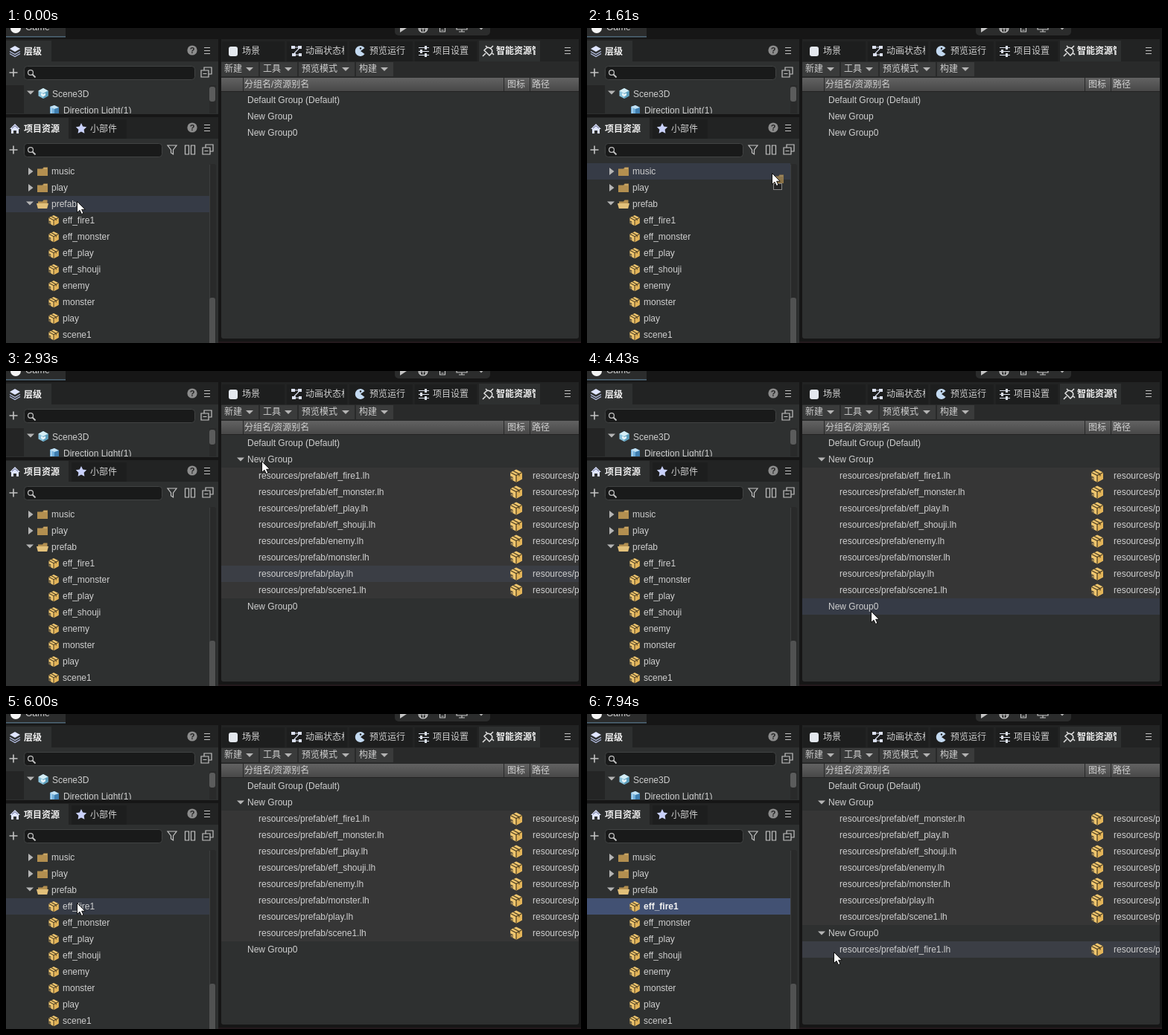
An HTML page that plays this animation: 772 px wide and 424 px high, repeating every 8000 ms.

```html
<!DOCTYPE html>
<html lang="zh-CN">
<head>
<meta charset="utf-8">
<title>Asset groups</title>
<style>
html, body { margin: 0; width: 100%; height: 100%; overflow: hidden; background: #161616; }
svg { display: block; }
text { font: 12px 'Liberation Sans', 'Noto Sans CJK SC', 'Noto Sans CJK', sans-serif; fill: #cfcfcf; white-space: pre; }
.b { font-weight: bold; fill: #f2f2f2; }
.line { fill: none; stroke: #c4c4c4; stroke-width: 1.2; }
</style>
</head>
<body>
<svg id="stage" width="772" height="424" viewBox="0 0 772 424"></svg>
<script>
const PANEL = '#2e3030', HEAD = '#222323', GAP = '#161616', HOVER = '#363b46', PICK = '#425173';
const ROW = 22, LEFT_TOP = 182, RIGHT_TOP = 86;

const rect = (x, y, w, h, fill, more = '') =>
  `<rect x="${x}" y="${y}" width="${w}" height="${h}" fill="${fill}" ${more}/>`;
const text = (x, y, s, more = '') => `<text x="${x}" y="${y}" ${more}>${s}</text>`;
const path = (d, fill, more = '') => `<path d="${d}" fill="${fill}" ${more}/>`;
const line = (d, more = '') => `<path d="${d}" class="line" ${more}/>`;
const use = (id, x, y, size = 16) =>
  `<use href="#${id}" x="${x}" y="${y}" width="${size}" height="${size}"/>`;
const down = (x, y, fill = '#b4b4b4') => path(`M${x - 5} ${y - 2.5}h10l-5 5z`, fill);
const right = (x, y) => path(`M${x - 3} ${y - 5}l6.5 5l-6.5 5z`, '#b4b4b4');
const symbol = (id, body) => `<symbol id="${id}" viewBox="0 0 16 16">${body}</symbol>`;
const clip = (id, x, y, w, h) => `<clipPath id="${id}">${rect(x, y, w, h, '#000')}</clipPath>`;

const defs = `<defs>
${symbol('box',
  path('M8 .5L15 4V12L8 15.7L1 12V4z', '#efc66f') +
  path('M8 7.6L15 4V12L8 15.7z', '#e3b458') +
  path('M1 4L8 7.6L15 4M8 7.6V15.7M4.5 2.2L11.5 5.9V8.4', 'none', 'stroke="#4c3e23" stroke-width="1.1"') +
  path('M1 8.2L4 9.6V13.6L1 12z', '#4a4232') + path('M2.2 10l1.2.6v1.7l-1.2-.6z', '#e6c27a'))}
${symbol('folder', path('M1 4.5H8L9.5 2.5H15V14H1z', '#b38f50') + path('M9.7 4H14', 'none', 'stroke="#e0be7d"'))}
${symbol('open', path('M2 7V4.5H8L9.5 2.5H14.5V7z', '#b38f50') + path('M0 7H16L14.2 14H1.8z', '#e2c07a'))}
${symbol('cube',
  path('M8 1L14.5 4.5V11.5L8 15L1.5 11.5V4.5z', '#8cc4dc') + path('M8 1L14.5 4.5L8 8L1.5 4.5z', '#d5eef6') +
  path('M8 8L14.5 4.5V11.5L8 15z', '#5c9fbd') + path('M5 7.5l3 1.6l3-1.6v3l-3 2l-3-2z', '#e8f4f8'))}
${symbol('node',
  path('M2 3L8 1L14 4V13L8 15.5L2 12z', '#6faedb') + path('M2 3L8 1L14 4L8 6z', '#c4e2f4') +
  path('M8 6L14 4V13L8 15.5z', '#3f7eb0') + path('M4 4v8', 'none', 'stroke="#d5eaf6"'))}
<linearGradient id="bar" x2="0" y2="1"><stop stop-color="#626262"/><stop offset="1" stop-color="#484848"/></linearGradient>
${clip('tree', 0, 77, 273, 38)}${clip('tabA', 380, 17, 74, 28)}${clip('tabB', 636, 17, 75, 28)}${clip('table', 289, 86, 480, 332)}
</defs>`;

const help = (x, y) => `<circle cx="${x}" cy="${y}" r="6.6" fill="#8c8c8c"/>` +
  text(x, y + 4, '?', 'text-anchor="middle" style="font-size:11px;font-weight:bold;fill:#222"');
const menu = (x, y) => line(`M${x - 4} ${y - 3.5}h8m-8 4h8m-8 4h8`);
const plus = y => line(`M4.500 ${y}h11m-5.500 -5.500v11`, 'style="stroke-width:1.6"');
const copy = (x, y) => line(`M${x - 3} ${y - 3}v-4h10v9h-4M${x - 7} ${y - 3}h10v9h-10zm2.500 4.500h5`);
const field = (y, w) => rect(24.5, y + .5, w, 18, '#191a1a', 'rx="4" stroke="#414343"') +
  `<circle cx="33" cy="${y + 9}" r="3.4" class="line"/>` + line(`M35.500 ${y + 11.5}l4 4`, 'style="stroke-width:1.8"');

function topBar() {
  return rect(0, 0, 80, 12, '#2b2c2c') + rect(0, 11, 80, 1.5, '#50697a') +
    '<circle cx="13" cy="0" r="7" fill="#f4f4f4"/>' + text(26, 3, 'Game', 'fill="#eee"') +
    rect(522, -10, 128, 20, '#2b2c2c', 'rx="5"') +
    path('M529 -6L538 0L529 6z', '#c4c4c4') +
    '<circle cx="560" cy="0" r="6" class="line"/>' + line('M554 1h12M560 -6v12M557 -5q-2 5 0 10M563 -5q2 5 0 10') +
    line('M582.500 -6h7v11h-7zm2 9h3') + line('M605 -6h14v8h-14zm7 8v3m-4 0h8') + down(638, 0);
}

function hierarchy() {
  return rect(0, 15, 285, 101, PANEL) + rect(0, 15, 285, 30, HEAD) + rect(0, 17, 61, 28, PANEL) +
    path('M5 28l7-4l7 4l-7 4z', '#dfe5ff') + line('M5 31.500l7 4l7 -4M5 34.500l7 4l7 -4', 'style="stroke:#b9c3e8"') +
    text(24, 36, '层级', 'class="b"') + help(250, 30) + menu(270, 30) +
    plus(60) + field(51, 229) + copy(269, 60) +
    rect(0, 77, 24, 38, '#242525') +
    '<g clip-path="url(#tree)">' + down(33, 87) + use('cube', 42, 80) + text(62, 93, 'Scene3D') +
    use('node', 57, 103) + text(77, 115, 'Direction Light(1)') + '</g>' +
    rect(273, 77, 9, 38, '#292a2a') + rect(273, 79, 8, 20, '#5b5c5c', 'rx="3"');
}

function projectHead() {
  return rect(0, 120, 285, 304, PANEL) + rect(0, 120, 285, 29, HEAD) + rect(0, 121, 84, 28, PANEL) +
    rect(88, 123, 74, 26, '#1d1e1e') +
    path('M5 136L12 129L19 136H17V142H7V136z', '#dfe5ff') + path('M10 142v-4h4v4z', PANEL) + path('M8 135l4-3.500l4 3.500', 'none', 'stroke="#596080"') +
    text(24, 140, '项目资源', 'class="b"') +
    path('M101 128l2.200 4.500l5 .7l-3.600 3.500l.8 5l-4.400-2.300l-4.400 2.300l.8-5l-3.600-3.500l5-.7z', '#c9d1fa') +
    text(113, 140, '小部件') + help(250, 134) + menu(270, 134) +
    plus(164) + field(155, 185) + line('M217 158h12l-4.500 6v6l-3 -2v-4z') +
    line('M240.500 158h5v12h-5zm8 0h5v12h-5z') + copy(271, 164) +
    rect(273, 183, 9, 241, '#292a2a', 'rx="3"') + line('M273.500 184v240', 'style="stroke:#3c3e3e"') +
    rect(273, 363, 8, 70, '#515252', 'rx="3"');
}

const assets = ['eff_fire1', 'eff_monster', 'eff_play', 'eff_shouji', 'enemy', 'monster', 'play', 'scene1'];

function projectRows(picked) {
  const folders = ['music', 'play', 'prefab'].map((name, i) => {
    const y = LEFT_TOP + i * ROW;
    return (i < 2 ? right(33, y + 11) : down(32, y + 10)) + use(i < 2 ? 'folder' : 'open', 41, y + 3) + text(61, y + 15, name);
  });
  const files = assets.map((name, i) => {
    const y = LEFT_TOP + (i + 3) * ROW;
    return use('box', 56.5, y + 3.5, 15) + text(76, y + 15, name, picked && !i ? 'class="b"' : '');
  });
  return folders.concat(files).join('');
}

function groupsHead() {
  const tab = (x, w) => rect(x, 18, w, 27, '#1d1e1e');
  const button = (x, w, label) => rect(x, 46, w, 19, '#3a3b3b') + text(x + 4, 59, label) + down(x + w - 12, 55.5);
  return rect(289, 15, 480, 403, PANEL, 'rx="3"') + rect(289, 15, 480, 30, HEAD) +
    tab(290, 84) + tab(377, 81) + tab(461, 85) + tab(549, 83) + rect(635, 17, 82, 28, PANEL) +
    rect(299, 25, 12, 13, '#e4e8ee', 'rx="3"') + text(317, 35, '场景') +
    '<g clip-path="url(#tabA)">' + text(402, 35, '动画状态机') + '</g>' +
    path('M383 24h5v4h-5zM392 24h5v4h-5zM384 34h5v4h-5zM393 34h4v4h-4z', '#dde2f2') + line('M388 26h4M393 28l-6 6M389 36h4', 'style="stroke:#dde2f2"') +
    path('M476 31L481.500 27A7 7 0 1 0 481.500 35z', '#c3d9f0') + '<circle cx="476" cy="27.500" r="1.200" fill="#222"/>' + text(488, 35, '预览运行') +
    line('M554 26.500h14m-14 5h14m-14 5h14', 'style="stroke:#dce2ee"') + rect(562, 24, 3, 5, '#dce2ee') + rect(556, 29, 3, 5, '#dce2ee') + rect(562, 34, 3, 5, '#dce2ee') +
    text(573, 35, '项目设置') +
    line('M640 38l4 -4M650 28l4 -4M642 30l7 7l3 -3q2 -4 -1 -6q-3 -3 -6 -1zM646 26l-2 -2M653 34l2 2', 'style="stroke:#e6e6e6;stroke-width:1.5"') +
    '<g clip-path="url(#tabB)">' + text(658, 35, '智能资源管理', 'class="b"') + '</g>' + menu(754, 30) +
    rect(289, 45, 480, 22, '#292a2a') + button(289, 50, '新建') + button(341, 50, '工具') + button(393, 75, '预览模式') + button(470, 50, '构建') +
    rect(289, 67, 480, 18, 'url(#bar)') + [318, 668, 703].map(x => rect(x, 67, 1, 18, '#262727')).join('') + rect(289, 85, 480, 1, '#222') +
    text(320, 80, '分组名/资源别名') + text(673, 80, '图标') + text(706, 80, '路径');
}

// stage: 0 empty, 1 filled but closed, 2 opened, 3 first asset moved to the last group
function groupList(stage) {
  const kids = list => list.map(name => ({ name: `resources/prefab/${name}.lh`, kid: true }));
  const rows = [{ name: 'Default Group (Default)' }, { name: 'New Group', arrow: [null, right, down, down][stage] }];
  if (stage > 1) rows.push(...kids(assets.slice(stage - 2)));
  rows.push({ name: 'New Group0', arrow: stage > 2 ? down : null });
  if (stage > 2) rows.push(...kids(assets.slice(0, 1)));
  return rows;
}

function groupRows(stage, hover) {
  return groupList(stage).map((row, i) => {
    const y = RIGHT_TOP + i * ROW;
    const back = i === hover ? rect(289, y, 480, ROW, row.kid ? '#3b3e45' : HOVER) : row.kid ? rect(289, y, 480, ROW, '#363636') : '';
    if (!row.kid) return back + (row.arrow ? row.arrow(315, y + 11) : '') + text(324, y + 15, row.name);
    return back + text(339, y + 15, row.name) + use('box', 676, y + 2, 18) + text(707, y + 15, row.name);
  }).join('');
}

// start, end, cursor tip at each step
const moves = [
  [0, 0, [[95, 233]]],
  [910, 1320, [[91, 233], [84, 234], [77, 235], [72, 235], [74, 234], [78, 234]]],
  [1460, 2090, [[86, 232], [160, 216], [248, 195], [290, 172], [317, 150], [332, 136], [339, 128], [342, 126], [343, 126]]],
  [2470, 2470, [[343, 121]]],
  [2930, 3400, [[343, 121], [346, 123], [351, 128], [357, 135], [362, 142], [366, 149], [368, 153]]],
  [3630, 4430, Array.from({ length: 11 }, (_, i) => {
    const p = (i + 1) / 11, e = p * p * (3 - 2 * p);
    return [368 + 13 * e, 153 + 170 * e];
  })],
  [4670, 5450, [[366, 328], [330, 340], [285, 356], [235, 371], [185, 379], [145, 372], [116, 354], [100, 337], [95, 324], [95, 298], [95, 275]]],
  [5540, 5830, [[95, 272], [95, 267], [95, 261], [95, 257], [95, 255]]],
  [6000, 6000, [[95, 254]]],
  [6700, 7250, [[108, 256], [156, 264], [212, 272], [262, 279], [295, 292], [315, 306], [327, 317], [331, 322]]],
  [7780, 7780, [[331, 320]]]
];

function tipAt(t) {
  const [start, end, tips] = moves.filter(m => m[0] <= t).pop();
  const last = tips.length - 1;
  const i = last ? Math.floor((t - start) * last / (end - start) + .15) : 0;
  return tips[Math.min(i, last)].map(Math.round);
}

function stateAt(t) {
  const [x, y] = tipAt(t);
  const between = (a, b) => t >= a && t < b;
  const stage = t < 2470 ? 0 : t < 2930 ? 1 : t < 7780 ? 2 : 3;
  const leftHover = x < 273 ? Math.floor((y - LEFT_TOP) / ROW) : -1;
  let rightHover = x >= 289 ? Math.floor((y - RIGHT_TOP) / ROW) : -1;
  if (between(2930, 3005)) rightHover = 8;
  if (between(7780, 7940)) rightHover = -1;
  const drag = between(1460, 2470) ? 'folder' : between(6700, 7780) ? 'box' : '';
  return { x, y, stage, leftHover, rightHover, drag, picked: t >= 6170 };
}

const pointer = path('M.5 .5V15.500L4 12.300L6.500 17.500L9 16.400L6.600 11.300H11.200z', '#fff', 'stroke="#111" stroke-width="1"');

function cursor({ x, y, drag }) {
  const ghost = drag && `<g opacity=".7">${use(drag, 1, 0)}</g>` +
    rect(2.5, 14.5, 11, 8, '#222', 'stroke="#fff"') +
    rect(2.5, 14.5, 11, 8, 'none', 'stroke="#111" stroke-dasharray="1 1"');
  return `<g transform="translate(${x} ${y})">${ghost}${pointer}</g>`;
}

document.getElementById('stage').innerHTML = defs + rect(0, 0, 772, 424, GAP) +
  topBar() + hierarchy() + projectHead() + groupsHead() + rect(285, 422, 487, 2, '#241a1d') +
  '<g id="left"></g><g id="right" clip-path="url(#table)"></g><g id="cursor"></g>';

const shown = {};
function put(id, key, build) {
  if (shown[id] === key) return;
  shown[id] = key;
  document.getElementById(id).innerHTML = build();
}

function draw(now) {
  const s = stateAt(now % 8000);
  put('left', `${s.leftHover} ${s.picked}`, () =>
    (s.leftHover >= 0 ? rect(0, LEFT_TOP + s.leftHover * ROW, 273, ROW, HOVER) : '') +
    (s.picked ? rect(0, LEFT_TOP + 3 * ROW, 273, ROW, PICK) : '') + projectRows(s.picked));
  put('right', `${s.stage} ${s.rightHover}`, () => groupRows(s.stage, s.rightHover));
  put('cursor', `${s.x} ${s.y} ${s.drag}`, () => cursor(s));
}

const begin = performance.now();
function tick() {
  draw(performance.now() - begin);
  requestAnimationFrame(tick);
}
tick();
</script>
</body>
</html>
```
